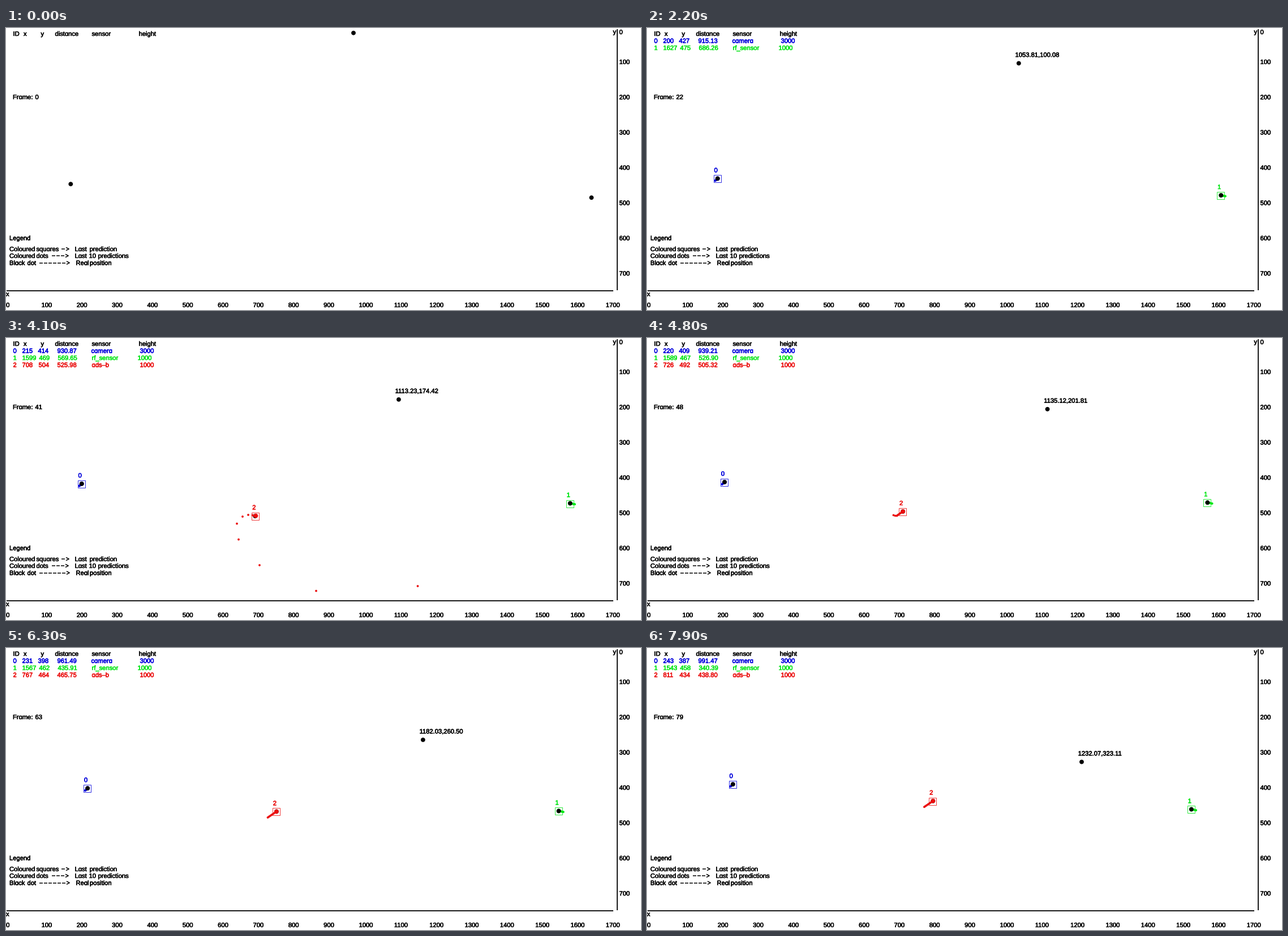
Animation of 1122 by 499 pixels, one loop 8 s. Source, as a matplotlib script:

```python
import numpy as np
import matplotlib.pyplot as plt
from matplotlib.animation import FuncAnimation
from matplotlib.patches import Circle, Rectangle
from matplotlib.patheffects import withStroke

W, H, DPI = 1122, 499, 100
SCALE = np.array([W / 1800, H / 800])  # world units to pixels
PT = 72 / DPI
FRAMES, STEP_MS = 80, 100
TRAIL = 10
BLACK, BLUE, GREEN, RED = "black", "#0000dc", "#00e614", "#eb0f0f"

fig = plt.figure(figsize=(W / DPI, H / DPI), dpi=DPI, facecolor="white")
ax = fig.add_axes([0, 0, 1, 1])
ax.set(xlim=(0, W), ylim=(H, 0))
ax.axis("off")


def write(x, mid, value, color=BLACK):
    """Text with its left edge at x, its capitals centred on mid."""
    # the lettering uses a one-storey a
    label = str(value).replace("a", "\u0251")
    return ax.text(x - 0.5, mid + 3.9, label, color=color, va="baseline",
                   family=["Liberation Sans", "DejaVu Sans"], fontsize=11.2 * PT,
                   path_effects=[withStroke(linewidth=0.6 * PT, foreground=color)])


def line(xs, ys, width):
    ax.plot(xs, ys, color=BLACK, lw=width * PT, solid_capstyle="butt")


def arrow(x, mid, dashes):
    for k in range(dashes):
        line([x + 8 * k, x + 8 * k + 5.8], [mid, mid], 1.5)
    tip = x + 8 * dashes
    line([tip, tip + 5.2, tip], [mid - 2.7, mid, mid + 2.7], 1.5)


def dot(center, radius, color, z):
    return ax.add_patch(Circle(center, radius, color=color, lw=0, zorder=z))


class Sensor:
    """A moving station and the filter that locks on to it."""

    def __init__(self, ident, kind, height, color, start, speed, born, lock_on, columns, z):
        self.ident, self.kind, self.height, self.color = ident, kind, height, color
        self.start, self.speed, self.born = np.array(start), np.array(speed), born
        self.lock_on = [np.array(p) / SCALE for p in lock_on]
        self.columns, self.z = columns, z

    def real(self, n):
        return self.start + self.speed * n

    def predicted(self, n):
        k = n - self.born - 1
        if k < len(self.lock_on):
            return self.lock_on[k]
        last = self.born + len(self.lock_on)
        error = self.lock_on[-1] - self.real(last)
        return self.real(n) + error * 0.55 ** (n - last)

    def draw(self, n):
        if n < self.born:
            return []
        parts = [dot(self.real(n) * SCALE, 3.9, BLACK, 4)]
        if n == self.born:
            return parts
        for k in range(max(self.born + 1, n - TRAIL + 1), n):
            parts.append(dot(self.predicted(k) * SCALE, 1.9, self.color, self.z))
        guess = self.predicted(n)
        x, y = guess * SCALE
        parts.append(dot((x, y), 3.9, self.color, self.z))
        parts.append(ax.add_patch(Rectangle(
            (round(x) - 6.5, round(y) - 6.5), 13, 13, fill=False,
            ec=self.color, lw=0.8 * PT, zorder=self.z)))
        parts.append(write(x - 5.7, y - 15, self.ident, self.color))

        gap = np.hypot(*(target(n) - self.predicted(max(n - 1, self.born + 1))))
        row = (self.ident, round(guess[0]), round(guess[1]), f"{gap:.2f}",
               self.kind, self.height)
        mid = 22.5 + 12.5 * self.ident
        parts += [write(cx, mid, v, self.color) for cx, v in zip(self.columns, row)]
        return parts


def target(n):
    return np.array([985 + 3.1275 * n, 14 + 3.91275 * n])


SENSORS = [
    Sensor(0, "camera", 3000, BLUE, (183.4, 442.7), (0.76, -0.71), 0,
           [(102, 245), (156.5, 378), (157.5, 377), (142, 338), (127.5, 301),
            (118.5, 278.5), (116, 268.2)],
           (13, 29, 57, 91, 151, 237), 3),
    Sensor(1, "rf_sensor", 1000, GREEN, (1659.6, 481.2), (-1.474, -0.2985), 0,
           [(913, 266), (1047.5, 304.5), (1015, 295), (1011, 294.5), (1009, 294),
            (1008.5, 294), (1009.2, 294)],
           (13, 29, 59, 92, 152, 233), 3),
    Sensor(2, "ads\u2013b", 1000, RED, (593.5, 582.1), (2.75, -1.875), 31,
           [(727.5, 439), (548, 447.5), (448, 402), (411, 356.5), (408, 328.5),
            (418, 316), (428, 313), (435.5, 313.5), (438.5, 314.5), (441.4, 314.6)],
           (13, 29, 58, 91, 152, 237), 5),
]


def draw_chart():
    line([1, 1073], [465, 465], 1.8)
    line([1080, 1080], [2, 464], 1.8)
    for k in range(18):
        write(62.33 * k + 0.7, 490, 100 * k)
    for k in range(8):
        write(1084, 62.375 * k - 2.5 if k else 7, 100 * k)
    write(0.5, 470.5, "x")
    write(1073, 6.5, "y")

    for x, title in zip((13, 31.5, 62, 87, 152, 235),
                        ("ID", "x", "y", "distance", "sensor", "height")):
        write(x, 10, title)
    write(12.5, 122, "Frame:")

    write(6.5, 371.5, "Legend")
    legend = [
        (391, {6.5: "Coloured", 54: "squares", 122: "Last", 148: "prediction"}, 98, 1),
        (403, {6.5: "Coloured", 54: "dots", 122: "Last", 147: "10", 163: "predictions"}, 81, 3),
        (415.5, {6.5: "Black", 38: "dot", 124: "Real", 148.5: "position"}, 59, 6),
    ]
    for mid, words, start, dashes in legend:
        for x, word in words.items():
            write(x, mid, word)
        arrow(start, mid, dashes)


live = []


def update(n):
    while live:
        live.pop().remove()
    tx, ty = target(n)
    x, y = target(n) * SCALE
    live.append(dot((x, y), 3.9, BLACK, 4))
    live.append(write(x - 5.8, y - 15.2, f"{tx:.2f},{ty:.2f}"))
    live.append(write(52, 122, n))
    for sensor in SENSORS:
        live.extend(sensor.draw(n))
    return live


draw_chart()
anim = FuncAnimation(fig, update, frames=FRAMES, interval=STEP_MS,
                     init_func=lambda: live, repeat=True, repeat_delay=0)
plt.show()
```
